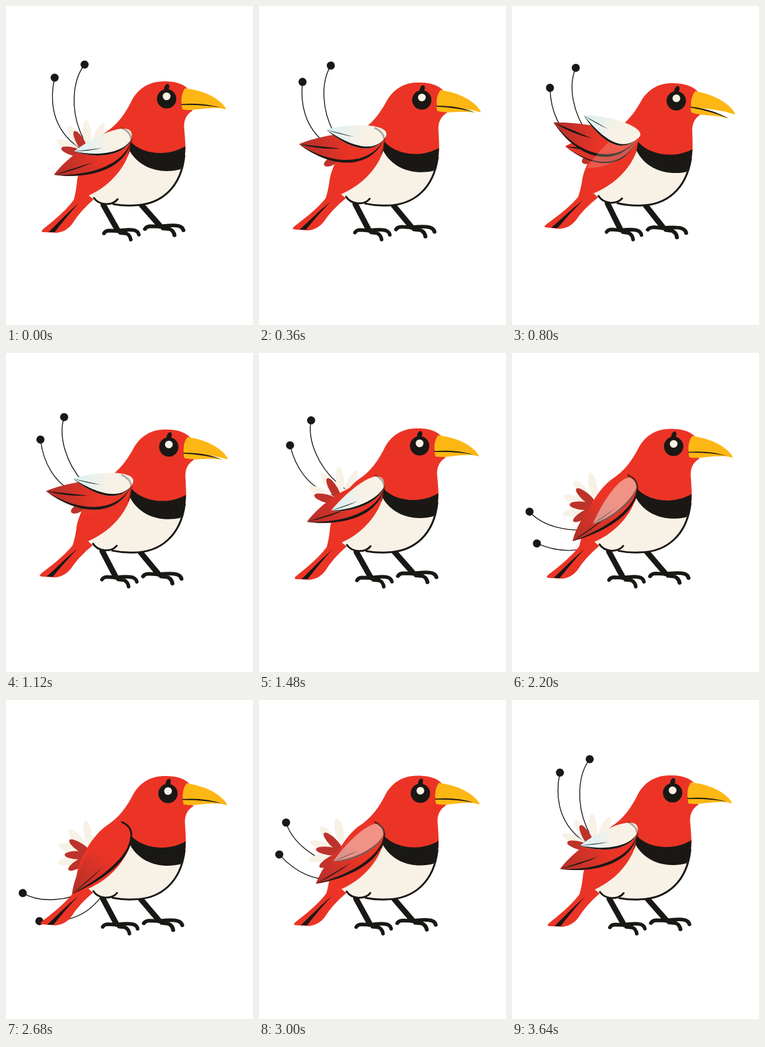
These frames come from a looping animation (396 px wide and 512 px high, 3.68 s). An HTML page with a canvas:

```html
<!DOCTYPE html>
<html lang="en">
<head>
<meta charset="utf-8">
<title>Red bird</title>
<style>
html, body { margin: 0; width: 396px; height: 512px; overflow: hidden; background: #fff; }
canvas { display: block; }
</style>
</head>
<body>
<canvas id="stage" width="396" height="512"></canvas>
<script>
const ctx = document.getElementById('stage').getContext('2d');
const LOOP = 3680, STEP = 40;
const RED = '#eb3426', DARK = '#b0302a', INK = '#1a1815', CREAM = '#f8f1e6', GOLD = '#fdb714';

const ramp = (t, a, b) => Math.min(1, Math.max(0, (t - a) / (b - a)));
const ease = (t, a, b) => { const u = ramp(t, a, b); return u * u * (3 - 2 * u); };
const pulse = (t, a, b, c, d) => ease(t, a, b) - ease(t, c, d);

// The whole pose follows from a flap upwards and a slow drop of wings and tail wires.
function poseAt(t) {
  const back = (1 - ramp(t, 2680, LOOP)) ** 1.5;
  const flap = pulse(t, 0, 640, 840, 1480);
  const drop = ease(t, 1600, 2500) * back;
  const lift = 36 * flap - 21 * drop - 25;
  return {
    flap, drop, lift,
    cover: lift + 12.5 * (1 - pulse(t, 1000, 1480, 2200, 3600)),
    sag: .3 * ramp(t, 0, 1640) * back + .7 * drop,
    lean: 3 * flap + 1.1 * drop,
    gape: 9 * pulse(t, 240, 560, 920, 1240),
    raised: pulse(t, 360, 600, 900, 1160),
    faded: pulse(t, 1960, 2440, 2720, 3280)
  };
}

function fill(d, color) {
  ctx.fillStyle = color;
  ctx.fill(new Path2D(d));
}
function line(d, width) {
  ctx.lineWidth = width;
  ctx.strokeStyle = INK;
  ctx.stroke(new Path2D(d));
}
function oval(x, y, rx, ry, color) {
  ctx.fillStyle = color;
  ctx.beginPath();
  ctx.ellipse(x, y, rx, ry, 0, 0, 7);
  ctx.fill();
}
// Draws with the origin at (x, y), turned by deg.
function at(x, y, deg, draw) {
  ctx.save();
  ctx.translate(x, y);
  ctx.rotate(deg * Math.PI / 180);
  draw();
  ctx.restore();
}
// Draws in stage coordinates, turned about (x, y).
function turn(x, y, deg, draw) {
  at(x, y, deg, () => { ctx.translate(-x, -y); draw(); });
}

function drawWires({ drop, sag }) {
  ctx.save();
  ctx.translate(-12 * drop, 97 * drop);
  turn(135, 192, -97 * sag, () => {
    line('M126 94C106 120 104 165 119 202S150 240 172 246', 1.4);
    line('M78 115C70 150 74 188 103 216S150 245 172 246', 1.4);
    oval(126, 94, 6.5, 6.5, INK);
    oval(78, 115, 6.5, 6.5, INK);
  });
  ctx.restore();
}

function drawFan({ drop, flap }) {
  const size = 1 - .5 * flap;
  const petals = (count, first, gap, len, color) => {
    for (let i = 0; i < count; i++) {
      at(132 + 7 * drop, 240 + 10 * drop, first + i * gap, () => oval((len - 21) * size, 0, 21 * size, 6.6, color));
    }
  };
  petals(4, 206 - 38 * ease(drop, 0, .6), 30, 57, CREAM);
  petals(3, 150, 45 - 13 * drop, 45, '#bd332b');
}

function drawLeg(x, y, footX, footY, size) {
  line(`M${x} ${y}L${footX} ${footY - 1}`, 9);
  at(footX, footY, 0, () => {
    ctx.scale(size, 1);
    line('M0 0L-14 -.5Q-20 0 -22 4M0 0Q18 -3 27 -1Q33 1 34 6M4 3L14 4Q20 7 21 14', 5.8);
  });
}

function drawBeak(gape) {
  fill('M287 132Q318 136 337 149Q350 158 353 166Q318 157 282 160Q279 143 287 132Z', GOLD);
  turn(283, 159, gape, () => {
    fill('M281 158Q317 155 344 163.500Q325 163 306 166Q294 168 283 166Z', GOLD);
    fill('M281 157.500Q317 154.500 344 163.500Q317 158 281 159Z', INK);
  });
}

function drawBody(gape) {
  drawLeg(156, 319, 179, 361, 1);
  drawLeg(217, 319, 247, 354, 1.1);

  // Tail, back, belly, collar
  fill('M108 312Q95 330 62 356Q53 363 61 363L82 364Q97 362 106 350Q118 330 141 310L133 304Z', RED);
  fill('M117 316C95 335 82 350 68 363L78 363C88 350 100 335 117 316Z', INK);
  fill('M291 132C280 122 265 121 253 121C225 121 209 137 201 153C192 171 180 190 158 204' +
    'C138 220 119 252 114 280C112 300 110 305 108 314L133 304C145 318 180 322 205 320' +
    'C250 316 275 290 281 262C290 240 288 225 286 200C284 185 288 175 299 168L282 150Z', RED);
  fill('M199 230C192 258 168 288 133 304C145 318 180 322 205 320C250 316 276 290 282 260Z', CREAM);
  fill('M200 218C220 239 260 242 287.500 225Q288 245 280 262C250 270 215 262 198 232Z', INK);
  line('M286 240C281 290 250 319 205 320Q188 321 172 318', 3);
  line('M141 308Q147 317 160 318Q173 318 179 310', 3);

  drawBeak(gape);
  oval(257.5, 149, 15.5, 15.5, INK);
  oval(257.5, 145, 6.2, 6.2, CREAM);
  fill('M253 138Q253 126 259 125Q264 126 260 137Z', INK);
}

// A feather lying along -x from the shoulder; top and low are the control points of its edges.
function blade(lift, len, top, low, colors, rim, alpha) {
  if (alpha <= 0) return;
  at(201, 213, lift, () => {
    const tip = `${-len} 0`, [x, y] = low.slice(2);
    const shade = ctx.createLinearGradient(-len, 0, 0, 0);
    colors.forEach((c, i) => shade.addColorStop(i * .6, c));
    ctx.globalAlpha = alpha;
    fill(`M${tip}C${top} 0 0C${low} ${tip}`, shade);
    if (rim) {
      fill(`M0 0C${low} ${tip}C${x} ${y - rim} ${low[0]} ${low[1] - rim} 0 0`, INK);
      fill(`M${tip}Q${-.75 * len} ${y / 4} ${-.52 * len} ${y / 4}Q${-.75 * len} ${y / 8} ${tip}`, INK);
    }
  });
}
function wing(lift, size, colors, rim, alpha) {
  blade(lift, 137 * size,
    [-100 * size, .35 * lift - 12, -20, .6 * lift - 18],
    [-25, 49 + .38 * lift, -85 * size, 47 + .55 * lift], colors, rim, alpha);
}
function cover(lift, colors, rim, alpha) {
  blade(lift, 94, [-58, -18, 16, .25 * lift - 30], [-18, 32 + .4 * lift, -66, 18], colors, rim, alpha);
}

function drawWings(p) {
  wing(-6, .85, [RED, '#c9332a'], 3, p.raised);
  wing(p.lift, 1, [DARK, RED], 6, 1);
  cover(-30, [CREAM], 0, .2 * p.raised);
  cover(p.cover, ['#d6f1f7', CREAM], 4.5, 1 - p.faded);
  ctx.globalAlpha = (.35 + .65 * p.faded) * (1 - p.raised);
  line('M186 196Q200 202 201 215Q201 226 196 237', 2.8);
  ctx.globalAlpha = 1;
}

function draw(t) {
  const p = poseAt(t);
  ctx.fillStyle = '#fff';
  ctx.fillRect(0, 0, 396, 512);
  ctx.lineCap = 'round';
  drawWires(p);
  drawFan(p);
  turn(200, 262, p.lean, () => drawBody(p.gape));
  drawWings(p);
}

const start = performance.now();
function tick() {
  const t = (performance.now() - start) % LOOP;
  draw(Math.floor(t / STEP) * STEP);
  requestAnimationFrame(tick);
}
tick();
</script>
</body>
</html>
```
